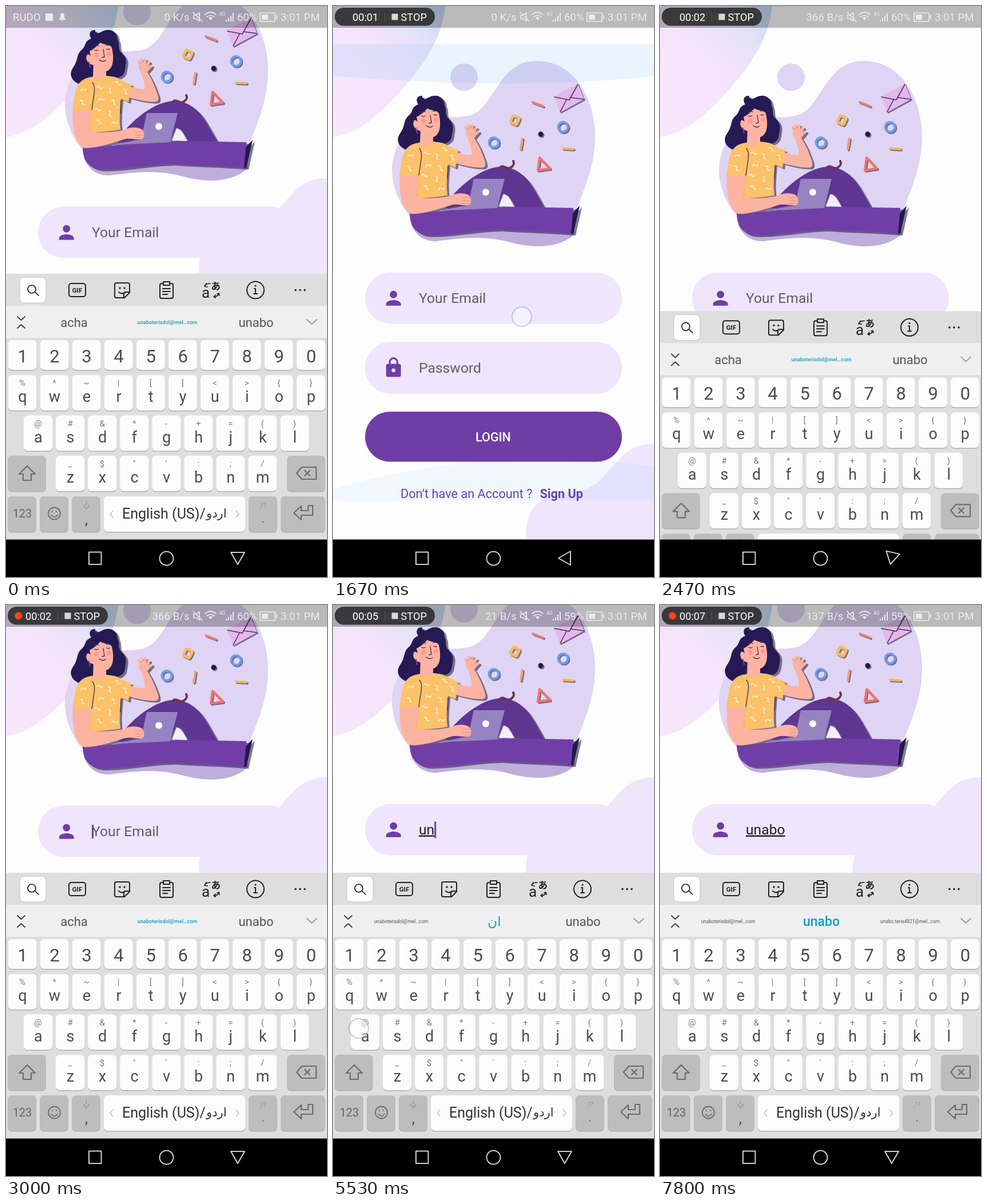
These frames come from a looping animation (561 by 998 pixels, 8 s). An HTML page:

```html
<!DOCTYPE html>
<html lang="en">
<head>
<meta charset="utf-8">
<title>Login screen</title>
<style>
html, body { margin: 0; width: 100%; height: 100%; overflow: hidden; background: #fdfdfd; }
svg { display: block; width: 561px; height: 998px; font-family: Roboto, sans-serif; }
.cast { filter: drop-shadow(4px 3px 0 rgba(45, 40, 70, .6)); }
.cast.small { filter: drop-shadow(2.5px 2.5px 0 rgba(45, 40, 70, .6)); }
.line { fill: none; stroke-linecap: round; stroke-linejoin: round; }
.mid { text-anchor: middle; }
.urdu { font-family: "DejaVu Sans", sans-serif; }
</style>
</head>
<body>
<svg viewBox="0 0 561 998">
  <defs>
    <linearGradient id="dawn" gradientUnits="userSpaceOnUse" x1="10" y1="190" x2="190" y2="10">
      <stop offset="0" stop-color="#f7e6fc"/><stop offset=".5" stop-color="#f4e4fb"/>
      <stop offset=".75" stop-color="#e6e2f8"/><stop offset="1" stop-color="#c9dcf8"/>
    </linearGradient>
  </defs>
  <rect width="561" height="998" fill="#fdfdfd"/>
  <path fill="url(#dawn)" d="M0 0H196C190 60 156 108 108 160C72 198 38 224 0 229Z"/>
  <path id="corner" fill="#efe6fd" d="M337 933C336 892 350 868 378 856C408 846 440 856 470 826C500 794 514 765 561 765V933Z"/>

  <g id="content">
    <g fill="#dfd4f3">
      <circle cx="229" cy="124.500" r="24"/>
      <path d="M103 288C103 255 118 225 150 205C180 190 215 198 240 191C282 180 288 96 355 96C425 96 458 165 458 228C458 285 434 330 424 360L140 372C118 352 104 320 103 288Z"/>
    </g>
    <path fill="#bfaddb" d="M136 380C144 402 160 412 182 411C230 404 270 402 310 413C350 424 396 424 423 398L420 375Z"/>
    <g class="cast">
      <path fill="#5f3692" d="M203 338C222 314 258 283 292 281C322 280 341 302 352 322C359 334 366 346 370 354H320C313 340 306 328 297 328L286 354H196Z"/>
      <path fill="#f3edfb" d="M298 329C307 330 312 341 317 351L290 350Z"/>
      <path fill="#251850" d="M416 365L431 349 420 398H412Z"/>
      <path fill="#713ea8" d="M134 361C170 362 200 357 238 354C300 349 360 352 420 353L416 398C372 394 330 394 292 391C244 392 206 402 166 401C142 398 134 382 134 361Z"/>
      <path fill="#261a54" d="M149 172C143 163 148 156 156 157C155 163 161 164 167 160C181 152 195 159 195 174C200 182 194 190 203 198C213 208 209 216 208 226C206 241 192 243 184 238L150 238C143 256 119 254 114 238C111 228 119 222 122 214C126 204 124 198 134 190C140 184 137 176 149 172Z"/>
      <path fill="#fdb3a1" d="M219 256C228 259 238 262 243 259C242 248 239 238 235 230C230 224 231 218 236 216H247C251 220 250 226 247 231C253 240 259 252 263 264C267 274 268 280 263 282C252 284 232 280 212 274Z"/>
      <path class="line" stroke="#fdb3a1" stroke-width="4.500" d="M237 223L232 212M240 220L237 209M243 220V209M246 222L249 213M247 227L253 220"/>
      <path fill="#fdb3a1" d="M117 292H151L146 334C166 337 186 336 205 332C214 327 228 326 236 330C243 334 243 345 238 348C228 349 216 345 206 348C180 357 150 365 136 363C119 355 115 325 117 292Z"/>
      <path fill="#fcc26a" d="M152 239C132 240 124 252 121 266L116 296H150L146 335Q174 336 200 331C197 310 200 295 201 277L214 283L219 252C206 249 200 242 190 239L176 237Z"/>
    </g>
    <path fill="#fdb3a1" d="M153 212L152 240C160 247 170 246 175 237V222Z"/>
    <path fill="#fdb3a1" d="M146 194C154 190 160 184 165 179C172 184 182 181 185 188C189 206 188 222 178 228C167 233 157 227 152 218C144 217 138 208 141 202C142 198 146 199 148 203Z"/>
    <g fill="#fa9a90"><circle cx="158" cy="201" r="4"/><circle cx="180" cy="199" r="4"/></g>
    <g class="line" stroke="#4b2a55" stroke-width="1.300">
      <path d="M155 192q3 2 6 0M176 190q3 2 5 0M154 186q4-3 8-1M175 184q3-2 6 0M170 191l2 13-4 1M163 209q6 5 11 1"/>
      <path stroke="#3b2a50" d="M151 249Q157 255 153 275L150 296M201 280l-1 22"/>
      <path stroke="#7a45b0" stroke-width="2" d="M145 213l2 9"/>
    </g>
    <g id="squiggles" class="line" stroke="#fff4dc" stroke-width="1.600"></g>
    <path fill="#6c5699" d="M184 358L242 346 290 351 286 354Z"/>
    <path fill="#9584c1" d="M246 302H300L287 353 184 358 236 348Z"/>
    <circle cx="267" cy="325.500" r="6" fill="#fff"/>
    <path fill="#fdb3a1" d="M205 332C214 327 228 326 236 330C243 334 243 345 238 348C228 349 216 345 206 348Z"/>
    <path class="line" stroke="#df8f88" d="M226 335l14 0M225 340l15 1M226 345l12 1"/>
    <path class="line" stroke="#713158" stroke-width="4" d="M291 283C298 275 303 288 311 282C317 278 317 275 315 271"/>
    <g class="cast small line" stroke-width="4">
      <path fill="#e4b9ea" stroke="none" d="M386 158L428 136 439 163 397 186Z"/>
      <path stroke="#46336f" stroke-width="1.600" d="M387 159L413 164 428 137M397 185L408 164M438 163L416 160"/>
      <path stroke="#ef7f78" d="M349 168L367 175"/>
      <rect x="312" y="193" width="12" height="13" rx="2" transform="rotate(25 318 199)" stroke="#f6bb62" stroke-width="5"/>
      <g stroke="#6b9fe9"><circle cx="281" cy="238.500" r="8.500"/><circle cx="402" cy="211.500" r="8.500"/></g>
      <circle cx="363" cy="224" r="4.500" fill="#251850"/>
      <path stroke="#f0a06a" d="M331 232L328 250"/>
      <path stroke="#ef746e" d="M361 265L358 287 379 284Z"/>
      <path stroke="#f6b65e" d="M402 249L420 250"/>
    </g>

    <rect x="56" y="465.500" width="449" height="90" rx="45" fill="#efe6fd"/>
    <rect x="56" y="587" width="449" height="91" rx="45" fill="#efe6fd"/>
    <rect x="56" y="709" width="449" height="87.500" rx="43.700" fill="#703da6"/>
    <g fill="#703da6">
      <path transform="translate(86.300 491.300) scale(1.620)" d="M12 12a4 4 0 1 0 0-8a4 4 0 0 0 0 8zM12 14c-2.670 0-8 1.340-8 4v2h16v-2c0-2.660-5.330-4-8-4z"/>
      <path transform="translate(86.300 612.500) scale(1.620)" fill-rule="evenodd" d="M18 8h-1V6A5 5 0 0 0 7 6v2H6a2 2 0 0 0-2 2v10a2 2 0 0 0 2 2h12a2 2 0 0 0 2-2V10a2 2 0 0 0-2-2zM12 17a2 2 0 1 1 0-4a2 2 0 0 1 0 4zM15.100 8H8.900V6a3.100 3.100 0 0 1 6.200 0z"/>
      <g font-size="21.700">
        <text x="118" y="859.500">Don’t have an Account ?</text>
        <text x="361.500" y="859.500" font-weight="700">Sign Up</text>
      </g>
    </g>
    <g font-size="24.700" fill="#625d68">
      <text id="hint" x="150" y="518.500">Your Email</text>
      <text x="150" y="640.500">Password</text>
      <text id="typed" x="150" y="518.500" fill="#212026" text-decoration="underline"></text>
    </g>
    <rect id="caret" x="150" width="3" fill="#703da6"/>
    <text class="mid" x="280" y="760.500" font-size="21.500" font-weight="500" fill="#fff">LOGIN</text>
  </g>

  <g fill="#2196f3">
    <path id="glowTop" fill-opacity=".09" d="M0 0H561V23Q330 34 0 23Z"/>
    <path id="glowEnd" fill-opacity=".06" d="M0 0V-18Q180-66 370-66Q490-64 561-54V0Z"/>
  </g>

  <g id="board">
    <rect y="468" width="561" height="465" fill="#dedede"/>
    <rect y="524" width="561" height="56" fill="#efefef"/>
    <rect x="24" y="474" width="46" height="45" rx="8" fill="#fefefe" stroke="#c6c6c6"/>
    <g class="line" stroke="#222" stroke-width="2">
      <path stroke-width="1.700" d="M51 500l6 6M52 495a7 7 0 1 0-14 0a7 7 0 1 0 14 0"/>
      <rect x="110" y="485" width="29" height="23" rx="4"/>
      <path d="M193 484h20q3 0 3 3v14l-9 9h-14q-3 0-3-3v-20q0-3 3-3zM216 500h-6q-4 0-4 4v6M197 500q6 5 11 0"/>
      <path d="M275 485h-3q-3 0-3 3v20q0 3 3 3h17q3 0 3-3v-20q0-3-3-3h-3M275 482h11v6h-11zM274 494h13M274 499h13M274 504h8"/>
      <path stroke-width="1.700" d="M347 490q2-5 10-5M350 485l-3 5 5 1M372 502q-1 6-9 6M369 503l3-1 1 4M366 505l-3 3 3 2"/>
      <circle cx="436" cy="496.500" r="15"/><path d="M434 494h2v9M433 503h6"/>
      <path stroke="#444" d="M20 543l6.500 6 6.500-6M20 563l6.500-6 6.500 6"/>
      <path stroke="#999" stroke-width="1.800" d="M526 548l8.500 8 8.500-8"/>
    </g>
    <g fill="#222">
      <circle cx="199" cy="493" r="1.700"/><circle cx="207" cy="493" r="1.700"/><circle cx="436" cy="489" r="1.600"/>
      <circle cx="506" cy="496.500" r="1.800"/><circle cx="514" cy="496.500" r="1.800"/><circle cx="522" cy="496.500" r="1.800"/>
      <text class="mid" x="124.500" y="500.500" font-size="11.500" font-weight="700">GIF</text>
      <text x="342" y="510" font-size="26">a</text>
      <text x="358.500" y="496" font-size="16.500" font-weight="700" style="font-family:'Noto Sans CJK JP','Noto Sans CJK',sans-serif">あ</text>
    </g>
    <g id="tips" class="mid"><text x="119"/><text x="282"/><text x="437"/></g>
    <g id="keys"></g>
    <g class="line" stroke="#6d6d6d" stroke-width="2.200">
      <path d="M37 804l14 14h-7v11h-14v-11h-7z"/>
      <path d="M517 806h25v21h-25l-9-10.500zM522 812l9 9M531 812l-9 9"/>
      <path d="M536 873h-8v9h-12v-8l-13 12 13 12v-8h20z"/>
      <g stroke-width="1.800"><circle cx="84.500" cy="887" r="10.500"/><path d="M79 890q5.500 6 11 0M81 883v1M88 883v1"/></g>
      <path stroke="#999" stroke-width="1.500" d="M136 872q0 5 4.500 5t4.500-5M140.500 877v3M140.500 866v6"/>
      <path stroke="#c4c4c4" stroke-width="1.600" d="M187 882l-5 6 5 6M402 882l5 6-5 6"/>
    </g>
    <g class="mid" fill="#454545">
      <text x="28.500" y="894" font-size="20" fill="#666">123</text>
      <text x="140.500" y="906" font-size="25">,</text><text x="449" y="903" font-size="25" fill="#777">.</text>
      <text x="449" y="877" font-size="13" fill="#999">,!?</text>
    </g>
    <text x="203" y="896" font-size="25" fill="#333">English (US)/</text>
    <text class="urdu" x="350" y="894" font-size="21" fill="#333">اردو</text>
  </g>

  <rect y="932.500" width="561" height="66" fill="#000"/>
  <rect id="ripple" x="342" y="934" width="126" height="64" rx="31" fill="#1e1e1e"/>
  <g class="line" stroke="#d0d0d0" stroke-width="2">
    <rect x="145" y="954.500" width="21.500" height="21.500"/><circle cx="280.500" cy="965.500" r="12"/>
    <path id="back" d="M-11 0L10-12V12Z"/>
  </g>

  <rect width="561" height="38" fill="#000" fill-opacity=".265"/>
  <g fill="#eaeaea" font-size="18.600">
    <text x="12" y="26">RUDO</text>
    <rect x="69" y="13" width="13" height="13"/>
    <path d="M92 24q3-2 3-7q0-4 3.500-5q3.500 1 3.500 5q0 5 3 7zM96.500 25h4l-2 2z"/>
    <text id="speed" x="320.500" y="26" text-anchor="end"></text>
    <text id="power" x="404" y="26"></text><text x="480" y="26">3:01 PM</text>
    <text x="373" y="17" font-size="8.500">4G</text>
    <path d="M354 21a5 5 0 0 1 7 0l-3.500 4zM384 24h2v3h-2zM388 21h2v6h-2zM392 17h2v10h-2zM396 12h2v15h-2zM447 15h11v9h-11zM472 16h2v7h-2z"/>
    <g class="line" stroke="#eaeaea" stroke-width="1.700">
      <path d="M348 15q9.500-8 19 0M351 19q6.500-5 13 0M328 16h4l6-4v14l-6-4h-4zM327 11l16 16"/>
      <rect x="444" y="12" width="26" height="15" rx="1"/>
    </g>
  </g>
  <g id="pill">
    <rect x="3" y="3" width="175" height="31.500" rx="15.700" fill="#2d2d2d" fill-opacity=".9"/>
    <circle id="dot" cx="21.800" cy="18.800" r="6.500" fill="#fb431f"/>
    <path stroke="#5c5c5c" d="M90.500 11V27"/>
    <rect x="102.500" y="13.500" width="11" height="11" fill="#d8d8d8"/>
    <g fill="#fff" font-size="18.200"><text id="clock" x="34" y="25.500"></text><text x="118.500" y="25.500">STOP</text></g>
  </g>
  <circle id="touch" r="17" fill="#fff" fill-opacity=".42" stroke="#7f90dc" stroke-opacity=".45" stroke-width="2"/>
</svg>
<script>
const LOOP = 8000;
const $ = id => document.getElementById(id);

function add(parent, tag, attrs, text = "") {
  const node = document.createElementNS("http://www.w3.org/2000/svg", tag);
  for (const k in attrs) node.setAttribute(k, attrs[k]);
  node.textContent = text;
  parent.append(node);
  return node;
}

// Shirt pattern
[[136, 262], [133, 284], [164, 258], [181, 263], [195, 251], [167, 279], [188, 284],
 [160, 297], [181, 303], [163, 318], [190, 320], [208, 265]].forEach(([x, y], i) =>
  add($("squiggles"), "path", {
    d: "M-5-1q3-4 5 0t5 1",
    transform: `translate(${x} ${y}) rotate(${(i * 67) % 110 - 30})`
  }));

// Keyboard
function key(x, y, w, h, fill = "#fcfcfc") {
  add($("keys"), "rect", { x, y: y + 1.5, width: w, height: h, rx: 7, fill: "#b0b0b0" });
  add($("keys"), "rect", { x, y, width: w, height: h, rx: 7, fill });
}
const label = (x, y, size, fill, text) =>
  add($("keys"), "text", { x, y, "font-size": size, fill, class: "mid" }, text);

function row(x, y, h, letters, marks = "") {
  [...letters].forEach((c, i) => {
    const left = x + i * 56.05, mid = left + 25;
    key(left, y, 50, h);
    if (marks) label(mid, y + 19, 15, "#7b7b7b", marks[i]);
    label(mid + .4, y + (marks ? 47 : 39), marks ? 27 : 31, "#4c4c4c", c);
  });
}
row(3.5, 584, 52, "1234567890");
row(3.5, 645, 62, "qwertyuiop", "%^~|[]<>{}");
row(31, 715.5, 62, "asdfghjkl", "@#&*-+=()");
row(87, 786, 62, "zxcvbnm", "_$\"':;/");
const GREY = "#bdbdbd";
[[3, 786, 67], [491, 786, 67], [3, 857, 50], [59, 857, 50], [115, 857, 50], [424, 857, 50], [480, 857, 78]]
  .forEach(([x, y, w]) => key(x, y, w, 62, GREY));
key(171, 857, 247, 62);

// Timeline
const NAME = "unabo";
const MAIL = "unaboterisdol@mel…com", MAIL2 = "unabo.teris4821@mel…com";
const STROKES = [3990, 4530, 5600, 6230, 7000];
const BLINKS = [-700, 700, 2700, ...STROKES];
const TIPS = [
  ["acha", MAIL, NAME], [MAIL, "u", NAME], [MAIL, "ان", NAME],
  [MAIL, "una", NAME], [MAIL, "unab", NAME], [MAIL, NAME, MAIL2]
];
const TOUCHES = [ // start, end, from x, y, to x, y
  [380, 870, 408, 968, 418, 998], [1000, 1400, 330, 420, 330, 620], [1450, 1830, 330, 700, 330, 430],
  [2170, 2290, 262, 512, 262, 512], [3920, 4130, 360, 695, 360, 695], [4460, 4600, 393, 832, 393, 832],
  [5520, 5660, 45, 740, 45, 740], [6160, 6300, 338, 830, 338, 830], [6930, 7070, 478, 690, 478, 690]
];
const SPEEDS = ["0 K/s", "366 B/s", "21 B/s", "137 B/s"];

const clamp = v => Math.min(1, Math.max(0, v));
const part = (t, a, b) => clamp((t - a) / (b - a));
const ease = p => p * p * (3 - 2 * p);

function put(node, attrs) { for (const k in attrs) node.setAttribute(k, attrs[k]); }
function write(node, text) { if (node.textContent !== text) node.textContent = text; }

// Rises to a peak, holds, then recedes
const pulse = (t, a, b, c, d, peak) => peak * part(t, a, b) * (1 - part(t, c, d));

function drawGlow(node, y, s) {
  put(node, { transform: `translate(0 ${y}) scale(1 ${s})`, opacity: clamp(s) });
}

function drawTips(tips) {
  [...$("tips").children].forEach((node, i) => {
    const mail = tips[i].includes("@"), main = i === 1;
    put(node, {
      y: mail ? 556 : 561,
      "font-size": mail ? (main ? 9.2 : 8.4) : (main ? 23 : 22),
      "font-weight": main ? 500 : 400,
      fill: main ? "#129fc6" : "#555",
      class: tips[i] === "ان" ? "urdu" : ""
    });
    write(node, tips[i]);
  });
}

function drawTouch(t) {
  const hit = TOUCHES.find(([a, b]) => t >= a && t < b);
  if (!hit) return put($("touch"), { opacity: 0 });
  const [a, b, x, y, x2, y2] = hit, p = part(t, a, b);
  put($("touch"), { cx: x + (x2 - x) * p, cy: y + (y2 - y) * p, opacity: clamp((b - t) / 70) });
}

function render(t) {
  const count = STROKES.filter(s => t >= s).length;
  const text = NAME.slice(0, count);

  // Keyboard and page scroll
  const down = t < 1500 ? ease(part(t, 430, 640)) : 1 - ease(part(t, 2280, 2530));
  const small = t < 430 || t >= 2530;
  const swap = part(t, 3990, 4150);
  const scroll = t < 430 ? 115 : 115 * ease(part(t, 2590, 2730)) + 3 * swap;
  put($("board"), { transform: `translate(0 ${464 * down})` });
  put($("corner"), { transform: `translate(0 ${small ? -464 : 0})` });
  put($("content"), { transform: `translate(0 ${-scroll})` });
  put($("back"), { transform: `translate(405 965) rotate(${-90 * (1 - down)})` });
  put($("ripple"), { opacity: part(t, 390, 480) * (1 - part(t, 790, 900)) });
  drawGlow($("glowTop"), 67, pulse(t, 1000, 1350, 1750, 2400, 2.4));
  drawGlow($("glowEnd"), 864.5, pulse(t, 1450, 1800, 1850, 2500, 1.75));

  // Email field
  write($("typed"), text);
  put($("hint"), { opacity: 1 - swap });
  const since = t - BLINKS.filter(b => b <= t).pop();
  put($("caret"), {
    x: 150 + (text ? $("typed").getComputedTextLength() : 0),
    y: text ? 496.5 : 499,
    height: text ? 29 : 24,
    opacity: since % 1000 < 500 ? 1 : 0
  });
  drawTips(TIPS[count]);

  // Status bar
  const beat = t - 1330;
  write($("clock"), "00:0" + Math.max(0, Math.floor(beat / 1000) + 1));
  put($("dot"), { opacity: (beat + 2000) % 1000 >= 400 ? 1 : 0 });
  put($("pill"), { opacity: part(t, 70, 200) });
  write($("speed"), SPEEDS[Math.floor((t + 1270) / 3000)]);
  write($("power"), t < 4730 ? "60%" : "59%");
  drawTouch(t);
}

const start = performance.now();
function tick() {
  render((performance.now() - start) % LOOP);
  requestAnimationFrame(tick);
}
tick();
</script>
</body>
</html>
```
